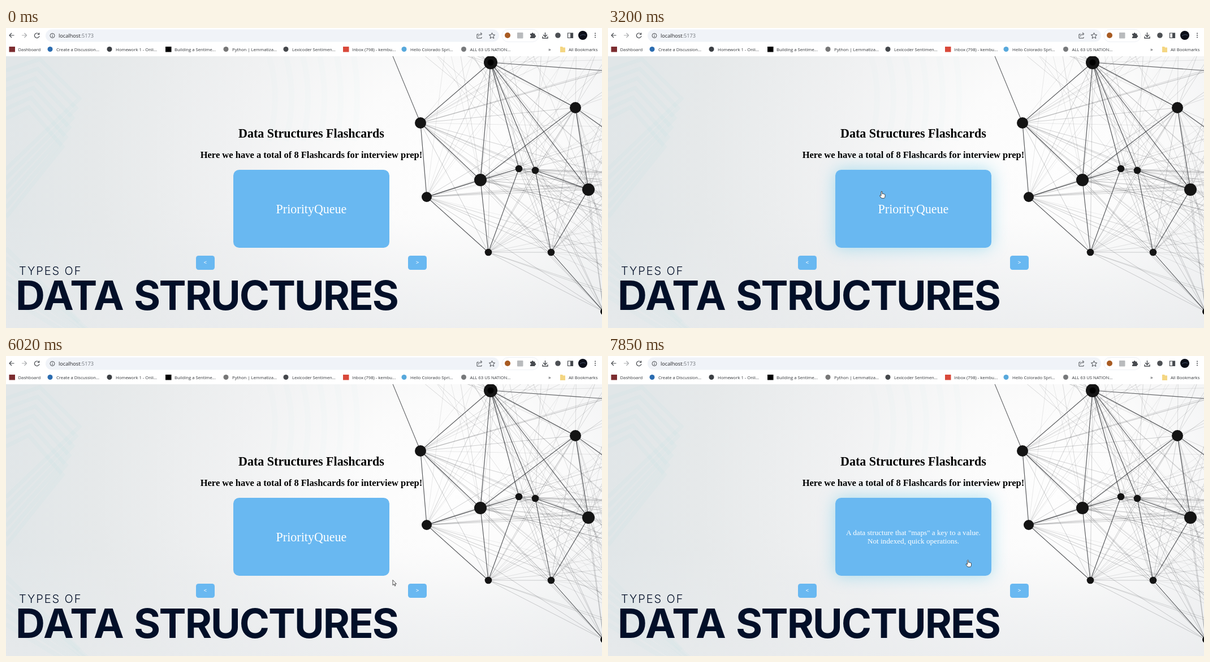
An HTML page that plays this animation: 1054x531 px, repeating every 8000 ms.

```html
<!DOCTYPE html>
<html lang="en">
<head>
<meta charset="utf-8">
<title>Flashcards</title>
<style>
  html, body { margin: 0; width: 100%; height: 100%; overflow: hidden; background: #fff; }
  svg { display: block; width: 100%; height: 100%; }
  .ui { font-family: "Open Sans", "Noto Sans", sans-serif; font-size: 7.7px; fill: #34373b; }
  .page { font-family: "Liberation Serif", "Times New Roman", serif; text-anchor: middle; }
  .poster { font-family: Inter, sans-serif; fill: #020f28; }
  .icon { fill: none; stroke: #474a4f; stroke-width: 1.2; }
</style>
</head>
<body>
<svg id="stage" viewBox="0 0 1054 531" preserveAspectRatio="none">
  <defs>
    <radialGradient id="paper" gradientUnits="userSpaceOnUse" cx="800" cy="230" r="800" gradientTransform="translate(0 20) scale(1 .92)">
      <stop offset="0" stop-color="#fefefe"/>
      <stop offset=".22" stop-color="#fbfbfb"/>
      <stop offset=".5" stop-color="#f0f1f2"/>
      <stop offset=".8" stop-color="#e6e9ea"/>
      <stop offset="1" stop-color="#e1e6e8"/>
    </radialGradient>
    <linearGradient id="floor" x2="0" y2="1">
      <stop offset=".6" stop-color="#e9ebed" stop-opacity="0"/>
      <stop offset="1" stop-color="#e9ebed" stop-opacity=".6"/>
    </linearGradient>
    <filter id="soft" x="-30%" y="-50%" width="160%" height="200%"><feGaussianBlur stdDeviation="15"/></filter>
    <filter id="softSmall" x="-50%" y="-50%" width="200%" height="200%"><feGaussianBlur stdDeviation="3"/></filter>
    <clipPath id="view"><rect y="50" width="1054" height="481"/></clipPath>
  </defs>

  <g clip-path="url(#view)">
    <rect y="50" width="1054" height="481" fill="url(#paper)"/>
    <rect y="50" width="1054" height="481" fill="url(#floor)"/>
    <g id="bands" fill="none" stroke="#9fd0d2"/>
    <g id="network" stroke="#25272b"/>
  </g>

  <g class="poster">
    <text x="23" y="436.5" font-size="20" font-weight="300" letter-spacing="1.9">TYPES OF</text>
    <g font-size="72" font-weight="700">
      <text x="17" y="499">DATA</text>
      <text x="226" y="499" letter-spacing="-2">STRUCTURES</text>
    </g>
  </g>

  <g class="page">
    <g font-weight="bold">
      <text x="540" y="194" font-size="22.04">Data Structures Flashcards</text>
      <text x="540" y="229.5" font-size="16.53">Here we have a total of 8 Flashcards for interview prep!</text>
    </g>
    <rect id="cardGlow" x="402" y="251" width="276" height="138" rx="10" fill="#6fcbe8" opacity="0" filter="url(#soft)"/>
    <rect x="402" y="251" width="276" height="138" rx="10.3" fill="#69b8f1"/>
    <g id="cardText" fill="#fff"></g>
    <rect id="nextGlow" x="711" y="403" width="33" height="25" rx="5" fill="#6fcbe8" filter="url(#softSmall)"/>
    <g fill="#69b8f1">
      <rect x="336" y="403" width="33" height="25" rx="4.5"/>
      <rect x="711" y="403" width="33" height="25" rx="4.5"/>
    </g>
    <g fill="#fff" font-size="9.2" style="font-family:'Liberation Sans',Arial,sans-serif">
      <text x="352.5" y="418">&lt;</text>
      <text x="727.5" y="418">&gt;</text>
    </g>
  </g>

  <g id="browser" class="ui">
    <rect width="1054" height="50" fill="#fff"/>
    <rect x="70" y="2.5" width="802" height="22" rx="11" fill="#f0f3f8"/>
    <rect x="877" y="2.5" width="65" height="22" rx="11" fill="#fff" stroke="#edf0f5"/>
    <g class="icon">
      <path d="M14.5 13H6M10 9l-4 4 4 4"/>
      <path d="M28 13h8.500M32.500 9l4 4-4 4" stroke="#a9abae"/>
      <path d="M58 10.500A4.300 4.300 0 1 0 59 14M58.700 8.500v3h-3"/>
      <circle cx="82" cy="13.500" r="4" stroke-width="1"/><path d="M82 13v3M82 11v1" stroke-width="1"/>
      <path d="M836 11h-3v7h8v-2M835.500 15q1-4.500 5-4.500M839 8l3 2.500-3 2.500" stroke-width="1"/>
      <path d="M859.500 8.500l1.500 3.400 3.700.3-2.800 2.500.9 3.700-3.300-2-3.300 2 .9-3.700-2.800-2.500 3.700-.3z" stroke-width="1"/>
      <path d="M953.500 8v7M950 12l3.500 3.500 3.500-3.500M949 15v3h9v-3" stroke-width="1.400"/>
      <path d="M993.500 9h9v8.500h-9z"/><path d="M1000 9v8.500" stroke-width="4"/>
    </g>
    <circle cx="887" cy="13" r="5" fill="#a85b22"/>
    <rect x="904" y="8" width="10.500" height="10.500" rx="1" fill="#b9bbbd"/>
    <path d="M927 10h2.500a1.700 1.700 0 0 1 3.400 0h2.600v2.700a1.700 1.700 0 0 1 0 3.400V18h-8.500v-2.500a1.500 1.500 0 0 0 0-3z" fill="#474a4f"/>
    <circle cx="976" cy="13" r="4.800" fill="#4d5054"/>
    <circle cx="1020" cy="13" r="8" fill="#0b0e18"/>
    <path d="M1015 14q5-4 10-1" stroke="#45536b" fill="none"/>
    <g fill="#474a4f"><circle cx="1042" cy="9.500" r="1"/><circle cx="1042" cy="13" r="1"/><circle cx="1042" cy="16.500" r="1"/></g>
    <text x="93" y="17" font-size="9.2" fill="#202124">localhost<tspan fill="#70757b">:5173</tspan></text>
    <text x="959" y="40.500" font-size="9">»</text>
    <path d="M980 33h4l1.200 1.500h3.800v8.500h-9z" fill="#f4d683"/>
    <text x="995" y="40.500">All Bookmarks</text>
  </g>

  <g id="cursor" stroke-linejoin="round">
    <path id="arrow" d="M0 0V9.200L2.100 7.300 3.600 10.600 5 10 3.600 6.800H6.400Z" fill="#fff" stroke="#222" stroke-width=".8"/>
    <path id="hand" d="M-1 .8Q0-.7 1 .8V4.500Q2 3.700 2.800 4.700 4 4.100 4.500 5.200 5.900 4.900 6 6.300V8.800Q6 11 4.500 12.300H-.3L-3.200 8.600Q-4 7.200-2.700 6.900L-1 8Z" fill="#fff" stroke="#222" stroke-width=".8"/>
  </g>
</svg>

<script>
const LOOP = 8000;
const byId = id => document.getElementById(id);

function add(parent, tag, attributes, text = "") {
  const node = document.createElementNS("http://www.w3.org/2000/svg", tag);
  for (const name in attributes) node.setAttribute(name, attributes[name]);
  node.textContent = text;
  return parent.appendChild(node);
}

// Bookmarks: label, text x, icon colour, icon shape
[
  ["Dashboard", 21.5, "#7c2d30", "square"],
  ["Create a Discussion...", 89, "#2b6cb0", "circle"],
  ["Homework 1 - Onli...", 194, "#3c3f43", "circle"],
  ["Building a Sentime...", 298, "#000", "square"],
  ["Python | Lemmatiza...", 400, "#777", "circle"],
  ["Lexicoder Sentimen...", 506, "#45484c", "circle"],
  ["Inbox (798) - kembu...", 612, "#d9493a", "square"],
  ["Hello Colorado Spri...", 715, "#58a9dc", "circle"],
  ["ALL 63 US NATION...", 820.5, "#77797b", "circle"],
].forEach(([label, x, fill, shape]) => {
  add(byId("browser"), "text", { x, y: 40.5 }, label);
  if (shape === "circle") add(byId("browser"), "circle", { cx: x - 11, cy: 37.5, r: 4.5, fill });
  else add(byId("browser"), "rect", { x: x - 16, y: 33, width: 10.5, height: 9.5, fill });
});

// Faint chevrons on the left and arcs near the top centre
for (let i = 0; i < 6; i++) {
  const shift = i * 17;
  add(byId("bands"), "path", { d: `M0 ${75 + shift}L${60 - i * 4} ${55 + shift}L${130 - i * 6} ${125 + shift}L0 ${250 + shift}`, "stroke-width": 7, opacity: .07 });
  add(byId("bands"), "path", { d: `M0 ${390 + shift}L${130 + shift} ${520 + shift}`, "stroke-width": 8, opacity: .06 });
  add(byId("bands"), "path", { d: `M${465 + i * 30} 50q${22 - i * 2} 70 0 150`, "stroke-width": 10, opacity: .035 });
}

// Network: x, y, radius
const nodes = [
  [857, 61, 12], [733, 168, 10], [1007, 141, 10], [839, 269, 11], [744, 299, 9],
  [907, 249, 6.3], [936, 252, 6.3], [1030, 286, 11], [853, 397, 6.3], [964, 397, 6.3],
  [1057, 502, 6], [680, 40, 0], [1120, 80, 0], [1110, 215, 0],
];
const strongPairs = [
  [11, 1], [0, 1], [0, 3], [0, 5], [0, 6], [0, 7], [0, 2], [0, 12], [1, 3], [1, 4],
  [3, 4], [3, 8], [3, 5], [3, 2], [4, 8], [5, 8], [6, 9], [6, 7], [7, 9], [2, 7], [9, 10], [2, 13],
];
let seed = 11;
const random = () => (seed = seed * 16807 % 2147483647) / 2147483647;
const line = ([x1, y1], [x2, y2], opacity, width) =>
  add(byId("network"), "line", { x1, y1, x2, y2, opacity, "stroke-width": width });

nodes.forEach((from, i) => {
  if (!from[2]) return;
  nodes.slice(i + 1).forEach(to => { if (to[2]) line(from, to, .3, .7); });
  for (let k = 0; k < 9; k++) {
    line(from, [1060 + random() * 90, 50 + random() * 440], .12 + random() * .25, .6);
    if (k < 5 && from[1] < 390) line(from, [690 + random() * 370, 20], .1 + random() * .2, .6);
  }
});
strongPairs.forEach(([a, b]) => line(nodes[a], nodes[b], .72, 1.1));
nodes.forEach(([cx, cy, r]) => add(byId("network"), "circle", { cx, cy, r, fill: "#141414", stroke: "none" }));
add(byId("network"), "circle", { cx: 857, cy: 61, r: 5.5, fill: "#000", stroke: "none" });

// Card faces over time
const queueName = ["PriorityQueue"], dequeName = ["Deque"], mapName = ["Map"];
const queueInfo = ["A special type of queue in which each element",
  "is associated with a priority value. Elements",
  "are served in order of their priority, most", "often built with a heap."];
const dequeInfo = ["Double ended queue, insert and remove at", "both the front and the rear."];
const mapInfo = ['A data structure that "maps" a key to a value.', "Not indexed, quick operations."];
const faces = [
  [0, queueName], [1670, queueInfo], [2130, queueName], [2850, queueInfo], [3130, queueName],
  [4230, dequeName], [4780, dequeInfo], [5050, dequeName], [5750, queueName],
  [7300, mapName], [7800, mapInfo],
];
let shownFace;
function showFace(face) {
  if (face === shownFace) return;
  shownFace = face;
  byId("cardText").replaceChildren();
  const isName = face.length === 1;
  face.forEach((text, i) => add(byId("cardText"), "text", {
    x: 540,
    y: isName ? 327.5 : 317 + 15 * (i - (face.length - 2) / 2),
    "font-size": isName ? 22.04 : 13.2,
  }, text));
}

// Pointer tip: time, x, y
const path = [
  [850, 938, 484], [1460, 486, 278], [1530, 486, 278], [1600, 485, 277.5], [2850, 485, 277.5],
  [2920, 484, 285], [3130, 484, 285], [3200, 484, 289], [3400, 484, 289], [4000, 727, 412],
  [4300, 727, 413], [4900, 603.5, 366], [5250, 603.5, 366], [5600, 727, 413], [5800, 727, 413],
  [6020, 684, 396.5], [6090, 684, 396.5], [6360, 637, 362], [6620, 637, 362], [6960, 656.5, 390],
  [7030, 656.5, 390], [7200, 727, 413], [7430, 727, 413], [7800, 636.5, 361], [LOOP, 636.5, 361],
];
const hovers = [[1130, 3600], [4550, 5400], [6070, 7020], [7500, 9000]];
const clamp = v => Math.max(0, Math.min(1, v));
const ease = v => v * v * (3 - 2 * v);
const inside = (x, y, left, top, right, bottom) => x >= left && x <= right && y >= top && y <= bottom;

function pointerAt(t) {
  const i = Math.max(1, path.findIndex(key => key[0] > t));
  const [t0, x0, y0] = path[i - 1], [t1, x1, y1] = path[i];
  const p = ease(clamp((t - t0) / (t1 - t0)));
  return [x0 + (x1 - x0) * p, y0 + (y1 - y0) * p];
}

function draw(now) {
  const t = now % LOOP;
  showFace(faces.filter(face => face[0] <= t).pop()[1]);

  const [x, y] = pointerAt(t);
  const overNext = t > 850 && inside(x, y, 711, 403, 744, 428);
  const overHand = overNext || inside(x, y, 402, 251, 678, 389);
  byId("cursor").setAttribute("transform", `translate(${x} ${y})`);
  byId("cursor").setAttribute("visibility", t < 850 ? "hidden" : "visible");
  byId("hand").setAttribute("opacity", overHand ? 1 : 0);
  byId("arrow").setAttribute("opacity", overHand ? 0 : 1);

  const glow = hovers.reduce((sum, [on, off]) =>
    sum + ease(clamp((t - on) / 280)) - ease(clamp((t - off) / 280)), 0);
  byId("cardGlow").setAttribute("opacity", glow * .6);
  byId("nextGlow").setAttribute("opacity", overNext ? .5 : 0);
  requestAnimationFrame(draw);
}
requestAnimationFrame(draw);
</script>
</body>
</html>
```
